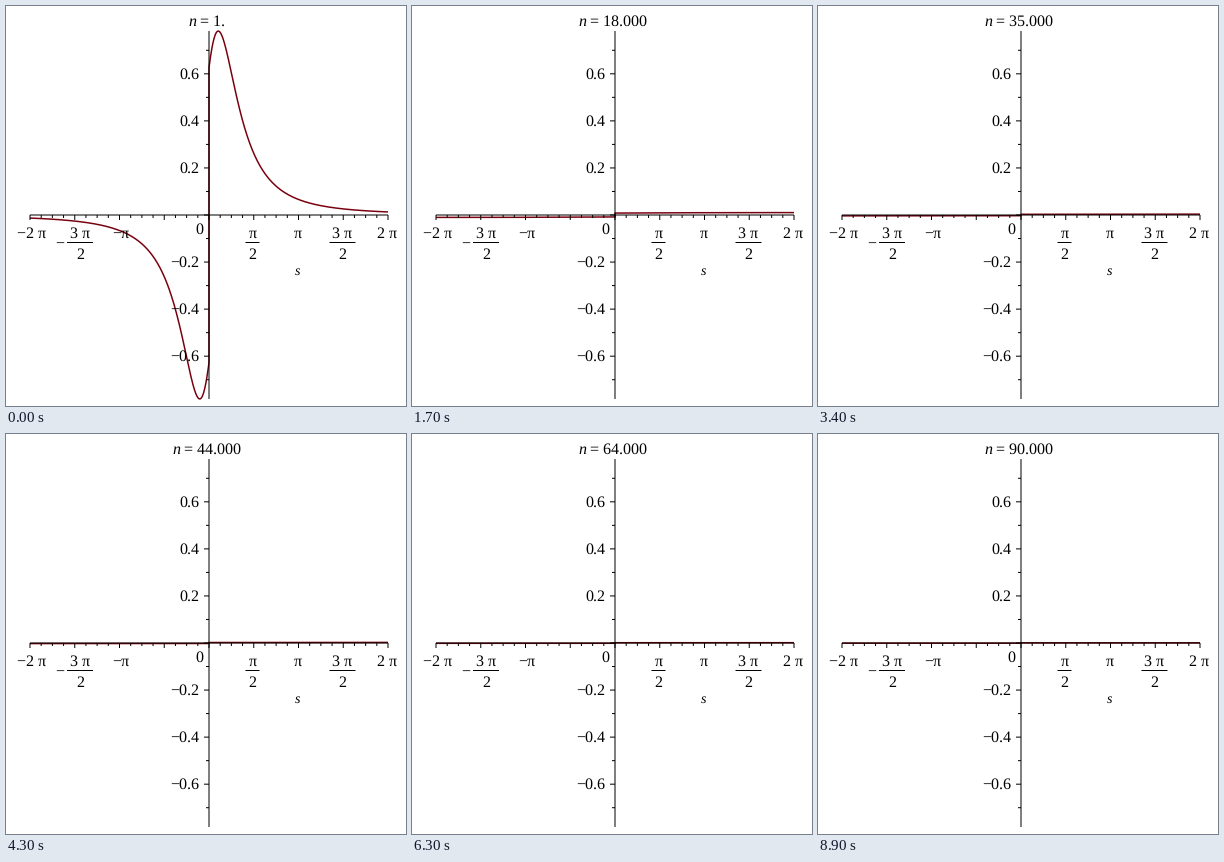
Animation, 400 px wide and 400 px high, one loop 9 s. Source, as a matplotlib script:

```python
import numpy as np
import matplotlib.pyplot as plt
from matplotlib.animation import FuncAnimation

SIZE, DPI = 400, 100
PX = 72 / DPI
X0, Y0 = 203, 209              # origin of the plot in pixels
HALF_W, HALF_H = 179, 184
SX, SY = HALF_W / (2 * np.pi), 235.3
FRAMES, STEP = 90, 100

plt.rcParams.update({"font.family": "Liberation Serif",
                     "text.hinting": "none"})
fig = plt.figure(figsize=(SIZE / DPI, SIZE / DPI), dpi=DPI, facecolor="white")
ax = fig.add_axes([0, 0, 1, 1])
ax.set_xlim(0, SIZE)
ax.set_ylim(SIZE, 0)
ax.axis("off")


def line(x1, y1, x2, y2):
    ax.plot([x1, x2], [y1, y2], color="black", lw=PX, zorder=3,
            solid_capstyle="butt", snap=False)


def text(x, y, s, ha="center", size=16, style="normal"):
    return ax.text(x, y, s, ha=ha, va="baseline", fontsize=size * PX,
                   style=style, color="black", zorder=4)


def fraction(x, top, half):
    text(x, 232, top)
    line(x - half, 236.5, x + half, 236.5)
    text(x, 253, "2")


def curve(n):
    """Transform of sqrt(t) exp(-n t), made odd in s."""
    s = np.linspace(0, 2 * np.pi, 500)
    phase = np.pi / 4 - 1.5 * np.arctan2(s, n)
    f = np.sqrt(np.pi) / 2 * (n * n + s * s) ** -0.75 * np.cos(phase)
    return np.r_[-s[::-1], s], np.r_[-f[::-1], f]


def draw_axes():
    line(X0 - HALF_W, Y0, X0 + HALF_W, Y0)
    line(X0, Y0 - HALF_H, X0, Y0 + HALF_H)
    for k in range(-16, 17):
        x = X0 + k * HALF_W / 16
        line(x, Y0, x, Y0 + (5 if k % 4 == 0 else 3))
    for k in range(-7, 8):
        y = Y0 - k * SY / 10
        line(X0 - (5 if k % 2 == 0 else 3), y, X0, y)
        if k and k % 2 == 0:
            label = f"{abs(k) / 10:.1f}"
            text(193.5, y + 5, ("−" if k < 0 else "") + label, "right")

    text(197.5, 228, "0", "right")
    text(25.5, 232, "−2 π")
    text(114.5, 232, "−π")
    text(291.5, 232, "π")
    text(381, 232, "2 π")
    fraction(74, "3 π", 13)
    text(53.5, 242, "−")
    fraction(246.5, "π", 7)
    fraction(336.5, "3 π", 13)
    text(292, 269, "s", size=14, style="italic")


draw_axes()
plot, = ax.plot([], [], color="#78000e", lw=1.5 * PX, zorder=2, snap=False,
                solid_capstyle="butt", solid_joinstyle="round")
name = text(166, 20, "n", "left", style="italic")
value = text(178, 20, "", "left")


def update(i):
    n = i + 1
    s, f = curve(n)
    plot.set_data(X0 + SX * s, Y0 - SY * f)
    digits = "1." if n == 1 else f"{n:.4f}" if n < 10 else f"{n:.3f}"
    left = 166 if n > 1 else 182
    name.set_x(left)
    value.set_x(left + 12)
    value.set_text("= " + digits)
    return plot, name, value


anim = FuncAnimation(fig, update, frames=FRAMES, interval=STEP,
                     repeat=True, repeat_delay=0)
plt.show()
```
